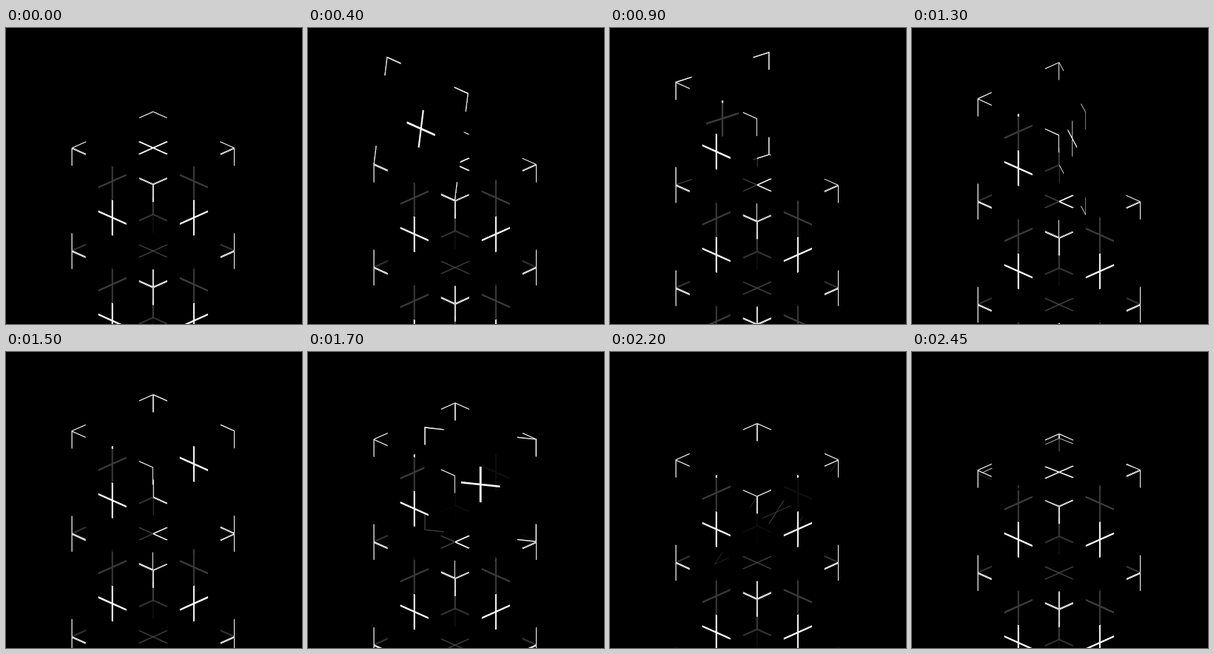
Write an HTML page that moves like this. It is 400x400 px and loops after 2500 ms.

```html
<!DOCTYPE html>
<html lang="en">
<head>
<meta charset="utf-8">
<title>Unfolding tower</title>
<style>
  html, body { margin: 0; width: 100%; height: 100%; overflow: hidden; background: #000; }
  svg { display: block; width: 100%; height: 100%; }
</style>
</head>
<body>
<svg viewBox="0 0 400 400">
  <defs>
    <g id="face">
      <path d="M0 0H100V100H0Z" fill="#000" fill-opacity=".77"/>
      <g fill="none" stroke="#fff">
        <path stroke-width="1.8" d="M50 32.7V67.3M32.7 50H67.3"/>
        <path stroke-width=".9" d="M.45 17.3V.45H17.3M82.7 .45H99.55V17.3M99.55 82.7V99.55H82.7M17.3 99.55H.45V82.7"/>
      </g>
    </g>
  </defs>
  <g id="tower"></g>
</svg>
<script>
const LOOP = 2500, STEP = 50, FOLD = 500, SIDES = 5, LOWER = 3;
const W = 110.15, D = W * 0.447, H = W * Math.SQRT2 * 0.8945;
const LEFT = 198.8 - W, BASE = 162;

const add = (a, b) => [a[0] + b[0], a[1] + b[1]];
const neg = a => [-a[0], -a[1]];
const mix = (a, b, c, s) => [a[0] * c + b[0] * s, a[1] * c + b[1] * s];

// Projected axes, measured from the left corner of a cube's floor
const O = [0, 0], U = [W, D], V = [W, -D], Z = [0, -H];

// Corner, hinge axis, folded direction, open direction
const sides = [
  [O, U, V, Z],
  [O, Z, U, V],
  [V, Z, neg(V), U],
  [add(U, V), Z, neg(U), neg(V)],
  [add(U, Z), V, neg(Z), neg(U)]
];
const paintOrder = [1, 2, 4, 3, 0];

const tower = document.getElementById("tower");

function addFace() {
  const el = document.createElementNS("http://www.w3.org/2000/svg", "use");
  el.setAttribute("href", "#face");
  return tower.appendChild(el);
}

function place(el, side, open, y) {
  const [corner, hinge, from, to] = sides[side];
  const a = open * Math.PI / 2;
  const arm = open === 1 ? to : mix(from, to, Math.cos(a), Math.sin(a));
  const m = [...hinge, ...arm].map(n => n / 100);
  el.setAttribute("transform", `matrix(${m} ${LEFT + corner[0]} ${y + corner[1]})`);
}

for (let i = LOWER; i > 0; i--) {
  for (const side of paintOrder) place(addFace(), side, 1, BASE + i * H);
}
const sheets = paintOrder.map(addFace);

function draw(t) {
  const phase = Math.floor(t / FOLD);
  const p = t / FOLD - phase;
  const open = p * p * (3 - 2 * p);
  tower.setAttribute("transform", `translate(0 ${H * t / LOOP})`);
  // Sheets not yet unfolded travel together with the moving one
  paintOrder.forEach((side, i) => {
    place(sheets[i], Math.min(side, phase), side < phase ? 1 : open, BASE);
  });
}

const start = performance.now();
function tick() {
  const t = (performance.now() - start) % LOOP;
  draw(Math.floor(t / STEP) * STEP);
  requestAnimationFrame(tick);
}
tick();
</script>
</body>
</html>
```
